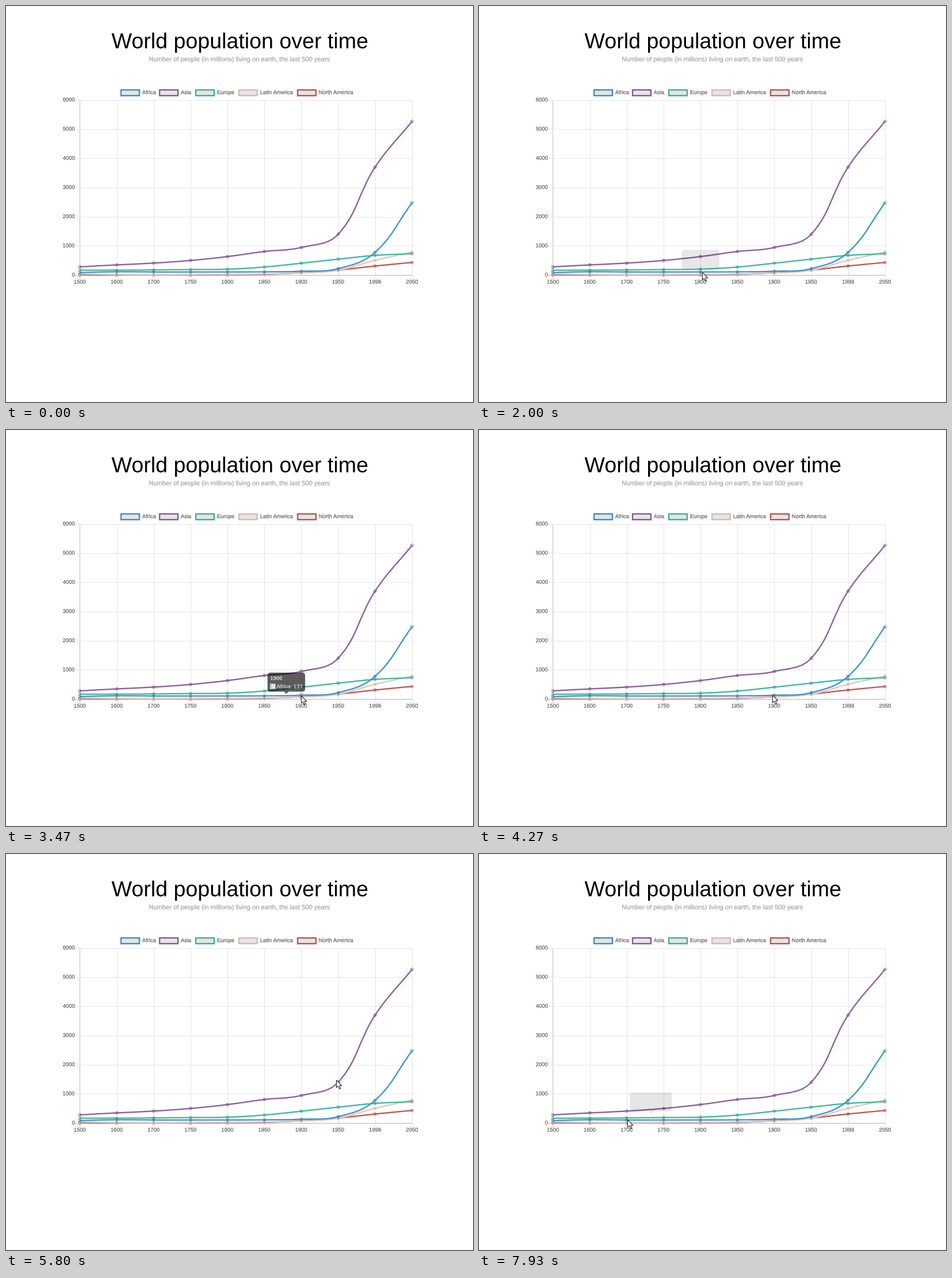
A matplotlib script for the animation above (8 s loop, 812 by 689 pixels).

```python
import numpy as np
import matplotlib.pyplot as plt
from matplotlib.animation import FuncAnimation
from matplotlib.patches import Circle, FancyBboxPatch, PathPatch, Polygon, Rectangle
from matplotlib.path import Path
from matplotlib.textpath import TextPath
from matplotlib.transforms import Affine2D

W, H, DPI = 812, 689, 64
PT = 72 / DPI              # points per pixel
S = 0.787                  # scale of the chart drawing
FONT = 12 * S
FRAMES, INTERVAL = 200, 40
STEP = 1000 / 15           # the screen refreshes 15 times a second
FADE = 6                   # length of a tooltip transition, in steps

YEARS = [1500, 1600, 1700, 1750, 1800, 1850, 1900, 1950, 1999, 2050]
SERIES = {
    "Africa": ("#3e95cd", 199.2, [86, 114, 106, 106, 107, 111, 133, 221, 783, 2478]),
    "Asia": ("#8e5ea2", 266.2, [282, 350, 411, 502, 635, 809, 947, 1402, 3700, 5267]),
    "Europe": ("#3cba9f", 329.2, [168, 170, 178, 190, 203, 276, 408, 547, 675, 734]),
    "Latin America": ("#e8c3b9", 404.2, [40, 20, 10, 16, 24, 38, 74, 167, 508, 784]),
    "North America": ("#c45850", 506.2, [6, 3, 2, 2, 7, 26, 82, 172, 312, 433]),
}
LEFT, RIGHT, TOP, BOTTOM = 128.4, 706.0, 163.5, 468.2

# tooltip shown from, hidden from, series, year index
TIPS = [
    (20.55, 27.5, "Africa", 4),
    (31.5, 39.35, "Europe", 4),
    (50, 57, "Africa", 6),
    (70.8, 71.8, "Africa", 6),
    (94.5, 107.5, "Asia", 7),
    (114.45, 116.73, "Europe", 2),
]
TIP_WIDTH = {"Africa": 65.4, "Asia": 65.6, "Europe": 72.6}
TIP_HEIGHT = 42 * S

# step, x, y of the mouse pointer
POINTER = np.array([
    (13, 772, 185), (15, 705, 410), (17, 570, 564), (19, 430, 505),
    (20, 387, 464), (21, 391, 462), (25, 389, 462), (28, 391, 470),
    (31, 387, 459), (33, 386, 457), (38, 386, 457), (39, 406, 457),
    (40, 425, 457), (42, 462, 459), (45, 500, 461), (47, 509, 461),
    (50, 509, 461), (52, 513, 462), (57, 516, 465), (60, 510, 462),
    (63, 509, 461), (64, 510, 461), (70, 510, 461), (71, 513, 459),
    (74, 540, 440), (78, 575, 398), (80, 582, 392), (83, 582, 391),
    (87, 574, 393), (94, 574, 393), (95, 577, 396), (97, 578, 397),
    (107, 578, 397), (108, 566, 405), (111, 430, 464), (115, 259, 460),
    (119, 258, 462),
])
ARROW = np.array([(0, 0), (0, 13), (3, 10.3), (5.2, 15.4),
                  (7.4, 14.4), (5.2, 9.5), (9.3, 9.5)])

fig = plt.figure(figsize=(W / DPI, H / DPI), dpi=DPI, facecolor="white")
ax = fig.add_axes([0, 0, 1, 1])
ax.set_xlim(0, W)
ax.set_ylim(H, 0)
ax.axis("off")


def px(i):
    return LEFT + (RIGHT - LEFT) * i / (len(YEARS) - 1)


def py(value):
    return BOTTOM - (BOTTOM - TOP) * value / 6000


def text(s, x, y, size=FONT, color="#666666", align=0.0, stroke=0.25,
         weight="normal", alpha=1, z=1):
    """Draw text with its baseline at y; align 0, .5 or 1 as left, centre, right."""
    path = TextPath((0, 0), s, size=size,
                    prop={"family": "Liberation Sans", "weight": weight})
    box = path.get_extents()
    shift = -align * (box.x0 + box.x1)
    path = path.transformed(Affine2D().scale(1, -1).translate(x + shift, y))
    return ax.add_patch(PathPatch(path, facecolor=color, edgecolor=color,
                                  lw=stroke * PT, alpha=alpha, zorder=z))


def line(xs, ys, color):
    ax.plot(xs, ys, color=color, lw=PT, zorder=0, solid_capstyle="butt")


def spline(points):
    """Smooth path whose control arms follow the neighbours, kept inside the plot."""
    before = np.vstack([points[:1], points[:-1]])
    after = np.vstack([points[1:], points[-1:]])
    d0 = np.hypot(*(points - before).T)
    d1 = np.hypot(*(after - points).T)
    arm = 0.4 * (after - before) / (d0 + d1)[:, None]
    c_in, c_out = points - arm * d0[:, None], points + arm * d1[:, None]
    for c in (c_in, c_out):
        c[:, 1] = np.clip(c[:, 1], TOP, BOTTOM)
    verts = [points[0]]
    for i in range(len(points) - 1):
        verts += [c_out[i], c_in[i + 1], points[i + 1]]
    return Path(verts, [Path.MOVETO] + [Path.CURVE4] * (len(verts) - 1))


def draw_grid():
    for i, year in enumerate(YEARS):
        line([px(i)] * 2, [TOP, BOTTOM + 6.5], "#e5e5e5" if i else "#bfbfbf")
        text(str(year), px(i), 483, align=0.5)
    for value in range(6000, -1, -1000):
        line([LEFT - 8, RIGHT], [py(value)] * 2, "#e5e5e5" if value else "#b4b4b4")
        text(str(value), 119.8, py(value) + 2.5, align=1)


def draw_legend():
    for name, (color, x, _) in SERIES.items():
        corner, w, h = (x + 1.2, 146.2), 40 * S, FONT
        ax.add_patch(Rectangle(corner, w, h, fill=False, ec=color, lw=3 * S * PT))
        ax.add_patch(Rectangle(corner, w, h, fc=(0, 0, 0, 0.1), lw=0))
        text(name, x + 37.6, 153.3)


def draw_series():
    dots = []
    for z, (color, _, values) in enumerate(reversed(list(SERIES.values())), 2):
        points = np.array([(px(i), py(v)) for i, v in enumerate(values)])
        ax.add_patch(PathPatch(spline(points), fill=False, ec=color,
                               lw=3 * S * PT, capstyle="butt", zorder=z))
        dots.append(ax.scatter(*points.T, s=28, facecolors=[(0, 0, 0, 0.1)],
                               edgecolors=color, linewidths=S * PT, zorder=z + 0.5))
    return dots


def ease(p):
    return 1 - (1 - min(max(p, 0), 1)) ** 4


def tip_target(name, i):
    """Top left corner of a tooltip at rest: left of Asia, above the others."""
    x, y = px(i), py(SERIES[name][2][i])
    if name == "Asia":
        return np.array([x - 7 * S - TIP_WIDTH[name], y - TIP_HEIGHT / 2])
    return np.array([x - TIP_WIDTH[name] / 2, y - 7 * S - TIP_HEIGHT])


def tip_state(n):
    """Series, year index, corner, opacity and hovered index at step n."""
    name = i = pos = hover = None
    opacity = 0
    for k, (on, off, new_name, new_i) in enumerate(TIPS):
        if n <= on:
            break
        until = min(n, TIPS[k + 1][0]) if k + 1 < len(TIPS) else n
        name, i = new_name, new_i
        target = tip_target(name, i)
        f = ease((min(until, off) - on) / FADE)
        pos = target if pos is None else pos + (target - pos) * f
        opacity += (1 - opacity) * f
        opacity *= 1 - ease((until - off) / FADE)
        hover = i if n <= off else None
    return name, i, pos, opacity, hover


def draw_tip(name, i, pos, alpha):
    x, y = pos
    w, h = TIP_WIDTH[name], TIP_HEIGHT
    color, _, values = SERIES[name]
    c = 5 * S
    if name == "Asia":
        caret = [(x + w, y + h / 2 - c), (x + w + c, y + h / 2), (x + w, y + h / 2 + c)]
    else:
        caret = [(x + w / 2 - c, y + h), (x + w / 2, y + h + c), (x + w / 2 + c, y + h)]
    dark = dict(fc="black", lw=0, alpha=0.8 * alpha, zorder=10)
    bx, by = x + 6 * S, y + 24 * S
    white = dict(color="white", alpha=alpha, z=12)
    return [
        ax.add_patch(FancyBboxPatch((x, y), w, h, mutation_aspect=1,
                                    boxstyle=f"round,pad=0,rounding_size={6 * S}", **dark)),
        ax.add_patch(Polygon(caret, **dark)),
        ax.add_patch(Rectangle((bx, by), FONT, FONT, fc="white", lw=0,
                               alpha=alpha, zorder=11)),
        ax.add_patch(Rectangle((bx + 0.4, by + 0.4), FONT - 0.8, FONT - 0.8, fc="#e6e6e6",
                               ec=color, lw=S * PT, alpha=alpha, zorder=11)),
        text(str(YEARS[i]), bx, y + 16.2 * S, weight="bold", stroke=0, **white),
        text(f"{name}: {values[i]}", bx + 14 * S, y + 34.4 * S, stroke=0.15, **white),
    ]


text("World population over time", 406, 73.5, size=37.6, color="black",
     align=0.5, stroke=0)
text("Number of people (in millions) living on earth, the last 500 years",
     406, 96.2, size=11.15, color="#999999", align=0.5, stroke=0.1)
draw_grid()
draw_legend()
dots = draw_series()
pointer = ax.add_patch(Polygon(ARROW, fc="white", ec="black", lw=0.9 * PT,
                               joinstyle="miter", zorder=20))
tip_parts = []


def update(frame):
    n = int(frame * INTERVAL / STEP + 0.5)
    while tip_parts:
        tip_parts.pop().remove()

    name, i, pos, opacity, hover = tip_state(n)
    if opacity > 0.01:
        tip_parts.extend(draw_tip(name, i, pos, opacity))
    sizes = [50 if k == hover else 28 for k in range(len(YEARS))]
    for d in dots:
        d.set_sizes(sizes, DPI)

    pointer.set_visible(n >= POINTER[0, 0])
    tip = [round(np.interp(n, POINTER[:, 0], POINTER[:, k])) + 0.5 for k in (1, 2)]
    pointer.set_xy(ARROW + tip)
    return []


anim = FuncAnimation(fig, update, frames=FRAMES, interval=INTERVAL,
                     init_func=lambda: [], repeat=True, repeat_delay=0, blit=False)
plt.show()
```
